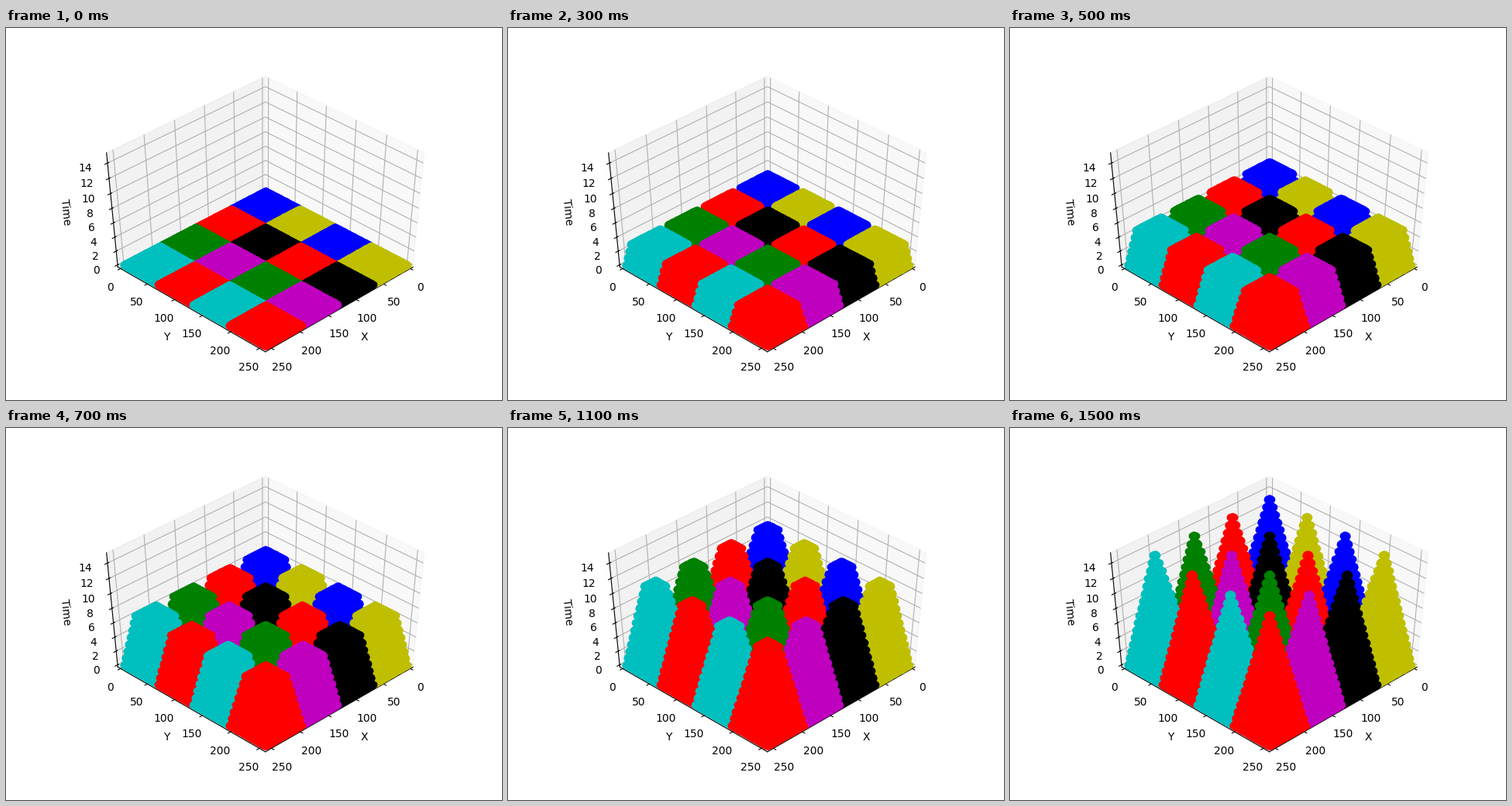
A matplotlib script that plays this animation: 640 px wide and 480 px high, repeating every 1.6 s.

```python
import numpy as np
import matplotlib.pyplot as plt
from matplotlib.animation import FuncAnimation

SIZE, BLOCK, LAYERS = 256, 64, 16
COLORS = ["byby", "rkrk", "gmgm", "crcr"]  # one row per x block, along y


def block_points(layer):
    """Offsets of a block's points; each layer is inset by two more units."""
    side = np.arange(2 * layer, BLOCK - 2 * layer)
    x, y = np.meshgrid(side, side, indexing="ij")
    lo, hi = side[0], side[-1]
    rim = np.minimum.reduce([x - lo, hi - x, y - lo, hi - y]) < 3
    # markers overlap heavily, so a sparse interior still fills solid
    keep = rim | ((x % 3 == 0) & (y % 3 == 0))
    return x[keep], y[keep]


def padded(top):
    pad = top / 48
    return -pad, top + pad


fig = plt.figure(figsize=(6.4, 4.8), dpi=100)
ax = fig.add_subplot(projection="3d")
ax.apply_aspect = lambda position=None: None  # fill the whole subplot box
ax.set_box_aspect((1, 1, 1), zoom=np.sqrt(3) / 1.8294640721620434)
ax.view_init(elev=45, azim=45)

layers = []
for t in range(LAYERS):
    x, y = block_points(t)
    z = np.full(x.shape, t)
    layers.append([
        ax.plot(x + BLOCK * i, y + BLOCK * j, z, color + "o", markersize=6)[0]
        for i, row in enumerate(COLORS)
        for j, color in enumerate(row)
    ])

ax.set_xticks(range(0, 251, 50))
ax.set_yticks(range(0, 251, 50))
ax.set_zticks(range(0, 15, 2))
ax.set_xlim(*padded(SIZE - 1))
ax.set_ylim(*padded(SIZE - 1))
ax.set_zlim(*padded(LAYERS - 1))
ax.set_xlabel("X")
ax.set_ylabel("Y")
ax.set_zlabel("Time")
ax.zaxis.set_rotate_label(True)


def update(frame):
    for t, lines in enumerate(layers):
        for line in lines:
            line.set_visible(t <= frame)
    return [line for lines in layers for line in lines]


anim = FuncAnimation(fig, update, frames=LAYERS, interval=100,
                     init_func=lambda: update(0), repeat=True, repeat_delay=0)
plt.show()
```
